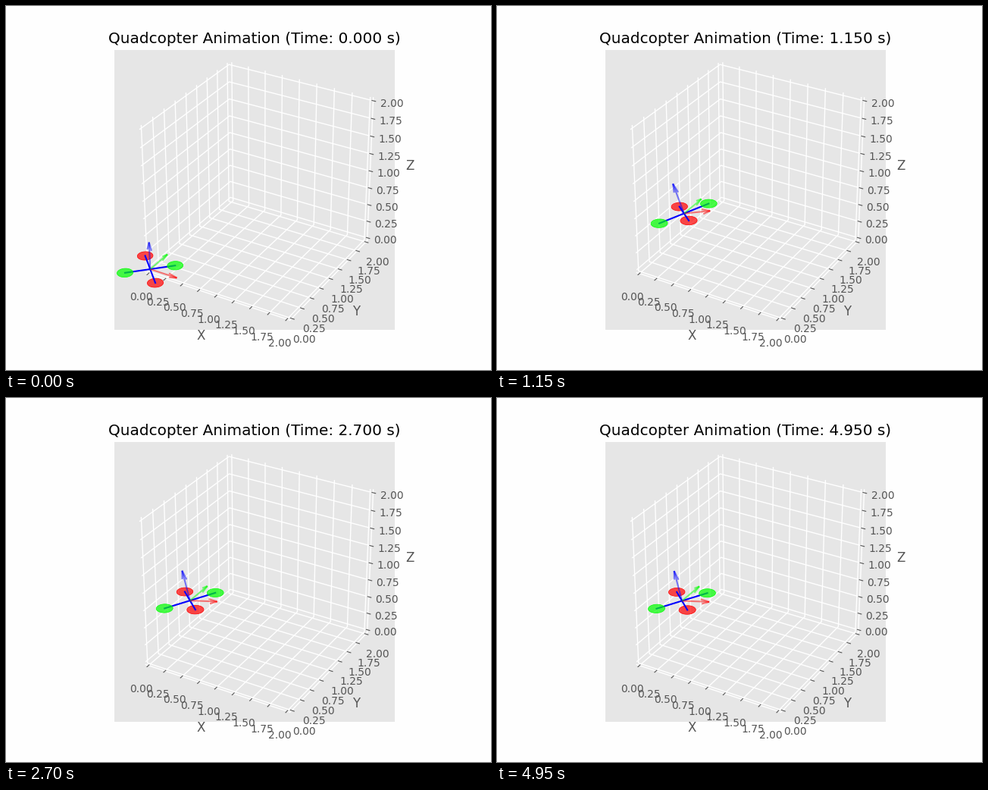
Recreate the animation shown at these times as a matplotlib script. Size 640x480 px, loop 5000 ms.

```python
import matplotlib.pyplot as plt
import numpy as np
from matplotlib.animation import FuncAnimation
from mpl_toolkits.mplot3d.art3d import Poly3DCollection

FRAMES = 100
STEP_MS = 50
ARM = 0.228
ROTOR_RADIUS = 0.1
AXIS_LENGTH = 0.4

# (time, value) turning points of the climb: overshoot, swing back, settle
PATH_X = [(0, 0), (0.5, 0.346), (1, 0.672), (1.9, 0.57), (3.2, 0.649), (4.4, 0.637)]
PATH_Z = [(0, 0), (0.5, 0.345), (1.15, 1.02), (1.5, 1.19), (2.9, 1.07), (4.4, 1.077)]
PITCH = [(0, 0), (0.5, 19.5), (0.85, 23.5), (2, 12.8), (3.2, 15.8), (4.4, 14.7)]


def glide(points, t):
    """Cubic curve through the points, level at both ends and each turn."""
    times, values = np.array(points, float).T
    t = min(t, times[-1])
    rates = np.diff(values) / np.diff(times)
    slopes = np.gradient(values, times)
    slopes[1:-1][rates[1:] * rates[:-1] <= 0] = 0
    slopes[[0, -1]] = 0
    i = min(np.searchsorted(times, t, side="right"), len(times) - 1) - 1
    h = times[i + 1] - times[i]
    s = (t - times[i]) / h
    ease = s * s * (3 - 2 * s)
    return (values[i] + (values[i + 1] - values[i]) * ease
            + h * s * (1 - s) * ((1 - s) * slopes[i] - s * slopes[i + 1]))


def pose(t):
    position = np.array([glide(PATH_X, t), 0, glide(PATH_Z, t)])
    a = np.radians(glide(PITCH, t))
    c, s = np.cos(a), np.sin(a)
    rotation = np.array([[c, 0, -s], [0, 1, 0], [s, 0, c]])
    return position, rotation


plt.style.use("ggplot")
plt.rcParams["axes3d.automargin"] = True
plt.rcParams["grid.linewidth"] = 1

fig = plt.figure(figsize=(6.4, 4.8), dpi=100, facecolor="#fefefe")
ax = fig.add_subplot(projection="3d", computed_zorder=False)
ax.set_facecolor("#e6e6e6")
ax.set_box_aspect((1, 1, 1))
ax.set(xlim=(0, 2), ylim=(0, 2), zlim=(0, 2),
       xlabel="X", ylabel="Y", zlabel="Z")
for axis in (ax.xaxis, ax.yaxis, ax.zaxis):
    axis.set_pane_color((1, 1, 1, 0))
title = ax.set_title("", color="black")

angle = np.linspace(0, 2 * np.pi, 48, endpoint=False)
disc = ROTOR_RADIUS * np.column_stack(
    [np.cos(angle), np.sin(angle), np.zeros_like(angle)])
diagonals = {
    "red": ARM * np.array([[-1, 1, 0], [1, -1, 0]]),
    "lime": ARM * np.array([[1, 1, 0], [-1, -1, 0]]),
}

arms = {color: ax.plot([], [], [], color="blue", lw=1.5, zorder=4)[0]
        for color in diagonals}
moving = []


def update(frame):
    t = frame * STEP_MS / 1000
    position, rotation = pose(t)
    while moving:
        moving.pop().remove()

    for color, hubs in diagonals.items():
        ends = position + hubs @ rotation.T
        arms[color].set_data_3d(*ends.T)
        # Rotor discs stay level while the frame tilts
        rotors = Poly3DCollection([end + disc for end in ends],
                                  color=color, alpha=0.7,
                                  zorder=3 if color == "red" else 5)
        ax.add_collection3d(rotors)
        moving.append(rotors)

    for direction, color in zip(rotation.T, ("red", "lime", "blue")):
        moving.append(ax.quiver(*position, *direction, length=AXIS_LENGTH,
                                color=color, alpha=0.5, zorder=6))

    title.set_text(f"Quadcopter Animation (Time: {t:.3f} s)")
    return [title, *arms.values(), *moving]


anim = FuncAnimation(fig, update, frames=FRAMES, interval=STEP_MS,
                     repeat=True, repeat_delay=0, blit=False)
plt.show()
```
